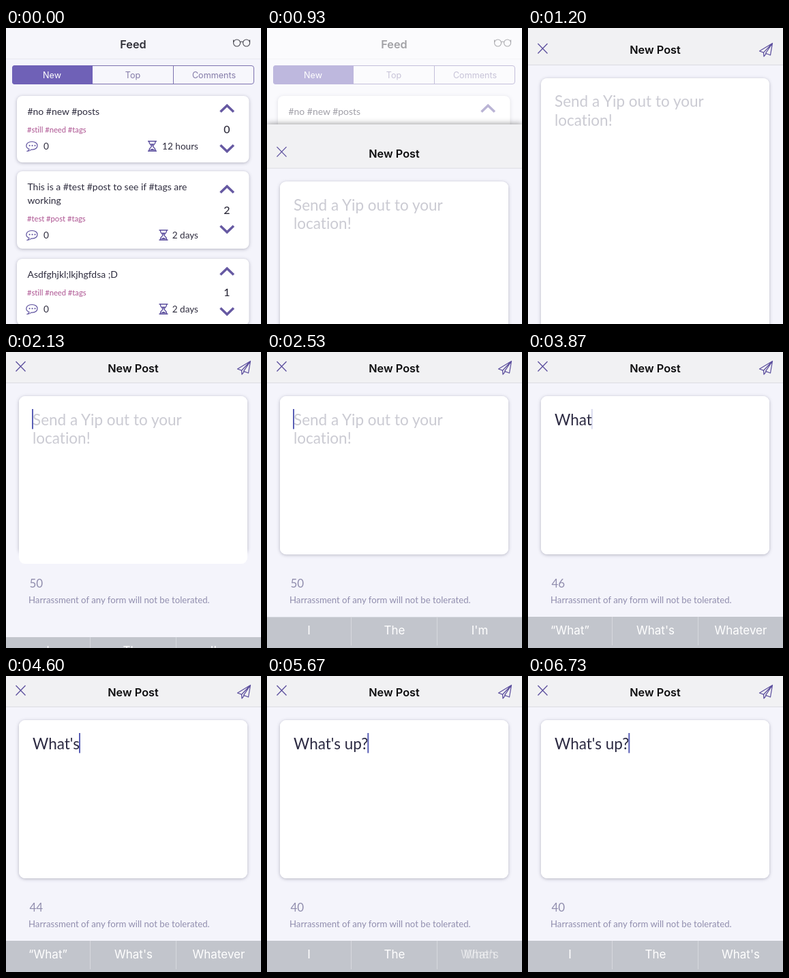
Animation of 374 by 436 pixels, one loop 6.94 s. Source, as an HTML page:

```html
<!DOCTYPE html>
<html lang="en">
<head>
<meta charset="utf-8">
<title>New Post</title>
<style>
  html, body { margin: 0; width: 100%; height: 100%; overflow: hidden; background: #f5f5fb; }
  svg { display: block; width: 374px; height: 436px; }
  text { font-family: Lato, "Open Sans", sans-serif; font-variant-ligatures: none; white-space: pre; }
  .ui { font-family: Inter, Roboto, sans-serif; text-anchor: middle; }
  .title { font-size: 16.3px; font-weight: 600; }
  .seg { font-size: 12.6px; fill: #847ba8; }
  .post { font-size: 13.95px; fill: #2e2c3e; }
  .tags { font-size: 11.2px; fill: #ad5391; }
  .meta { font-size: 13.6px; fill: #2e2c3e; }
  .score { font-size: 16px; font-weight: 500; fill: #2a2838; text-anchor: middle; }
  .big { font-size: 22.5px; }
  .hint { fill: #cbcbd3; }
  .note { fill: #918eae; }
  .sugg { font-size: 17px; fill: #fff; }
  .line { fill: none; stroke: #5c4f9e; }
  .arrow { fill: none; stroke: #6659a2; stroke-width: 3.5; }
  .shadow { filter: drop-shadow(0 1px 2.5px rgba(40, 40, 70, .32)); }
</style>
</head>
<body>
<svg viewBox="0 0 374 436">
  <defs>
    <g id="bubble" class="line" stroke-width="1.2">
      <path d="M-4.5 4.8C-11 2.5-10-6 0-6S10 5.6 0 5.6L-1.5 5.5C-3 7.5-5 8-7 8C-5.3 7-4.6 6-4.5 4.8Z"/>
      <path d="M-4 -.2h.1M0-.2h.1M4-.2h.1" stroke-width="2" stroke-linecap="round"/>
    </g>
    <g id="glass" class="line" stroke-width="1.4">
      <path d="M-6.5-7.3H6.5M-6.5 7.3H6.5M-4.7-7C-4.7-2-1-2-1 0S-4.7 2-4.7 7M4.7-7C4.7-2 1-2 1 0S4.7 2 4.7 7"/>
      <path d="M-3-3.6H3L0-.6ZM-4 6.3Q0 1 4 6.3Z" fill="#5c4f9e" stroke="none"/>
    </g>
  </defs>

  <g id="feed">
    <rect width="374" height="436" fill="#f4f4fb"/>
    <rect width="374" height="45" fill="#f6f6fb"/>
    <path d="M0 45.5H374" stroke="#e9e9f0"/>
    <text class="ui title" x="186.5" y="29.5" fill="#2f2f37">Feed</text>
    <g fill="none" stroke="#45454d" stroke-width="1.1">
      <circle cx="338.6" cy="22" r="5"/><circle cx="352.6" cy="22" r="5"/>
      <path d="M343.4 20.8Q345.6 19.2 347.8 20.8M333.6 21V17.5M357.6 21V17.5"/>
    </g>
    <rect x="9.5" y="55.5" width="354" height="27" rx="3.5" fill="#f7f7fc" stroke="#7d72b0"/>
    <path d="M127 55H13a4 4 0 0 0-4 4V79a4 4 0 0 0 4 4H127Z" fill="#6f61b7"/>
    <path d="M245.5 55V83" stroke="#7d72b0"/>
    <text class="ui seg" x="67.5" y="73.6" style="fill:#fff">New</text>
    <text class="ui seg" x="186" y="73.6">Top</text>
    <text class="ui seg" x="305" y="73.6">Comments</text>
    <g id="posts"></g>
  </g>
  <rect id="veil" width="374" height="436" fill="#fff"/>

  <g id="modal">
    <rect y="-19" width="374" height="700" fill="#f4f4fb" style="filter:drop-shadow(0 -1px 4px rgba(0,0,0,.4))"/>
    <rect y="-19" width="374" height="64" fill="#f1f1f3"/>
    <path d="M0 45.5H374" stroke="#dcdce2"/>
    <path class="line" d="M14.5 14L28.5 28.5M28.5 14L14.5 28.5" stroke-width="1.3"/>
    <text class="ui title" x="186.5" y="29.5" fill="#0b0b0d">New Post</text>
    <path id="send" class="line" stroke-width="1.25" stroke-linejoin="round"
      d="M358.5 13.5L339.5 25L345.5 27.2L358.5 13.5L348.5 28.3L355.5 31L358.5 13.5M345.5 27.2L346 33L349.5 28.7"/>
    <rect id="shade" class="shadow" x="19" y="65" width="335" height="233" rx="9" fill="#fff"/>
    <rect id="paper" x="19" y="65" width="335" height="233" rx="9" fill="#fff"/>
    <g id="hint" class="big hint">
      <text x="39" y="107.5">Send a Yip out to your</text>
      <text x="39" y="135">location!</text>
    </g>
    <text id="typed" class="big" x="39" y="107.5" fill="#2c2a42"></text>
    <rect id="caret" y="84" width="2" height="29.5" fill="#5a5fb6"/>
    <g id="notes" class="note">
      <text id="left" x="34.5" y="346.5" font-size="17"></text>
      <text x="33" y="369.5" font-size="13.2">Harrassment of any form will not be tolerated.</text>
    </g>
  </g>

  <g id="keys">
    <rect width="374" height="60" fill="#c2c5cc"/>
    <path d="M123.5 0V42M249.5 0V42" stroke="#d6d8dd"/>
  </g>
</svg>
<script>
const LOOP = 6940;
const $ = id => document.getElementById(id);

const posts = [
  { top: 100, h: 98, lines: ["#no #new #posts"], tags: "#still #need #tags", score: 0, age: "12 hours", glass: 214.5 },
  { top: 211, h: 114, lines: ["This is a #test #post to see if #tags are", "working"], tags: "#test #post #tags", score: 2, age: "2 days", glass: 231 },
  { top: 340, h: 98, lines: ["Asdfghjkl;lkjhgfdsa ;D"], tags: "#still #need #tags", score: 1, age: "2 days", glass: 231 }
];

function card({ top, h, lines, tags, score, age, glass }) {
  const mid = top + h / 2;
  const lineY = i => top + 27.5 + i * 20;
  const tagY = lineY(lines.length - 1) + 26;
  const metaY = tagY + 25;
  const text = lines.map((s, i) => `<text class="post" x="31.5" y="${lineY(i)}">${s}</text>`).join("");
  return `<rect class="shadow" x="16" y="${top}" width="340.5" height="${h}" rx="8" fill="#fff"/>${text}
    <text class="tags" x="31" y="${tagY}">${tags}</text>
    <use href="#bubble" x="38.5" y="${metaY - 5}"/>
    <text class="meta" x="55" y="${metaY}">0</text>
    <use href="#glass" x="${glass}" y="${metaY - 4.5}"/>
    <text class="meta" x="282" y="${metaY}" text-anchor="end">${age}</text>
    <text class="score" x="324" y="${mid + 6}">${score}</text>
    <path class="arrow" d="M314.5 ${mid - 25.5}l9.7-9.3l9.7 9.3M314.5 ${mid + 23.5}l9.7 9.3l9.7-9.3"/>`;
}
$("posts").innerHTML = posts.map(card).join("");

const message = "What's up?";
const strokes = [2800, 2930, 3070, 3200, 4330, 4530, 4870, 5130, 5400, 5600];

const hints = [
  [0, "I", "The", "I'm"],
  [2930, "“W”", "We", "When"],
  [3470, "“What”", "What's", "Whatever"],
  [4630, "“What's”", "Whats", "Whatever"],
  [4930, "up", "the", "your"],
  [5400, "“up”", "upon", "upcoming"],
  [5590, "I", "The", "When"],
  [5600, "I", "The", "What's"]
];
const FADE = 133;

// two stacked labels per slot, so that words can cross-fade
const slots = [61.5, 187, 312].map(x => [0, 1].map(() => {
  const el = document.createElementNS("http://www.w3.org/2000/svg", "text");
  el.setAttribute("class", "ui sugg");
  el.setAttribute("x", x);
  el.setAttribute("y", 25.5);
  return $("keys").appendChild(el);
}));

const clamp = v => Math.max(0, Math.min(1, v));
const settle = (t, start, dist) => t < start ? dist : dist * Math.exp(-0.0107 * (t - start));
const shift = (id, y) => $(id).setAttribute("transform", `translate(0 ${y.toFixed(2)})`);

function caretAlpha(t) {
  if (t < 1930) return 0;
  for (const [out, back] of [[3730, 4130], [6130, 6670]]) {
    if (t >= out && t < back) return clamp(1 - (t - out + 67) / 267);
    if (t >= back && t < back + 60) return 0.5;
  }
  return 1;
}

function drawHints(t) {
  const i = hints.findLastIndex(h => t >= h[0]);
  const now = hints[i], old = hints[Math.max(0, i - 1)];
  const mix = clamp((t - now[0]) / FADE);
  slots.forEach(([a, b], k) => {
    const same = now[k + 1] === old[k + 1];
    a.textContent = old[k + 1];
    b.textContent = now[k + 1];
    a.style.opacity = same ? 0 : 1 - mix;
    b.style.opacity = same ? 1 : mix;
  });
}

function draw(t) {
  const rise = settle(t, 833, 455);
  $("modal").style.display = t < 833 ? "none" : "";
  shift("modal", rise);
  $("veil").style.opacity = 0.85 * (1 - rise / 455);
  $("send").style.opacity = clamp((t - 970) / 200);

  const editing = t >= 1858;
  $("paper").setAttribute("height", 233 + settle(t, 1858, 258));
  $("shade").setAttribute("height", editing ? 233 : 491);
  $("notes").style.display = editing ? "" : "none";
  shift("keys", 390 + settle(t, 1929, 258));

  const count = strokes.filter(s => t >= s).length;
  const typed = $("typed");
  typed.textContent = message.slice(0, count);
  $("hint").style.display = count ? "none" : "";
  $("left").textContent = 50 - count;
  $("caret").setAttribute("x", 38 + (count ? typed.getComputedTextLength() : 0));
  $("caret").style.opacity = caretAlpha(t);
  drawHints(t);
}

// the picture advances 15 times per second
const snap = t => Math.round(Math.floor((t + 4) * 0.015) * 20 / 3) * 10;

let start;
function tick(now) {
  start ??= now;
  draw(snap((now - start) % LOOP));
  requestAnimationFrame(tick);
}
draw(0);
requestAnimationFrame(tick);
</script>
</body>
</html>
```
